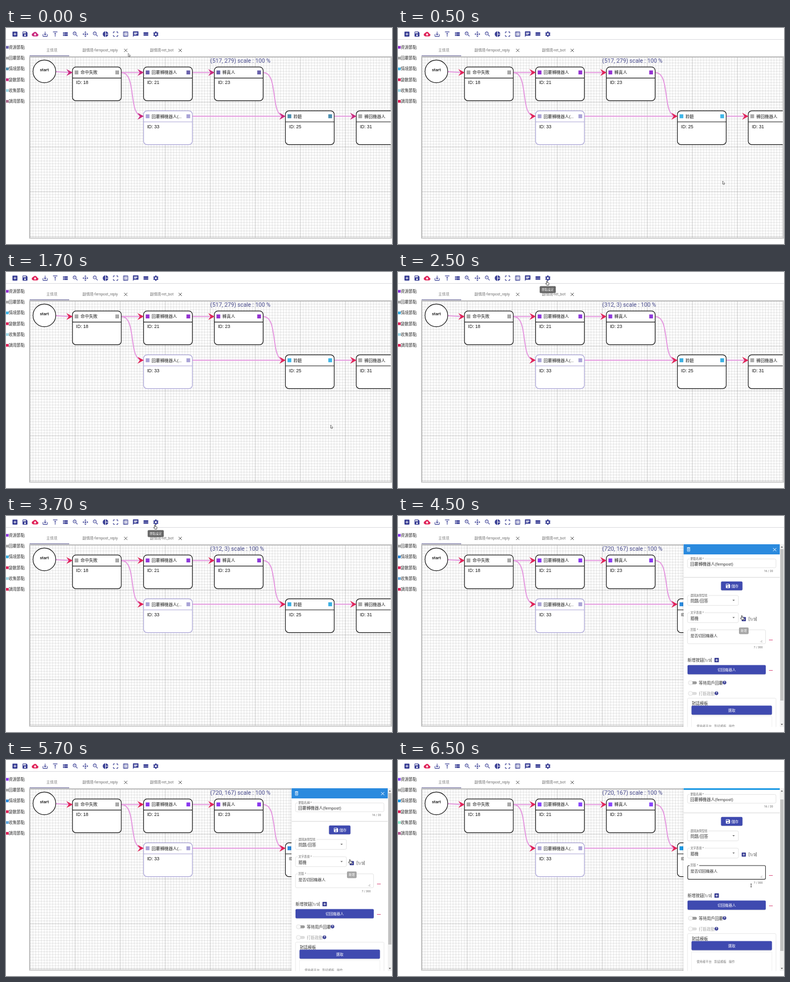
These frames come from a looping animation (720 px wide and 405 px high, 8000 ms). An HTML page:

```html
<!DOCTYPE html>
<html lang="zh-Hant">
<head>
<meta charset="utf-8">
<title>Flow editor</title>
<style>
html, body { margin: 0; width: 100%; height: 100%; overflow: hidden; background: #fff; }
svg { display: block; width: 720px; height: 405px; animation: play 8s step-end infinite; }
text { font-family: Roboto, "Noto Sans CJK TC", "Noto Sans CJK", sans-serif; white-space: pre; }
.id { font-family: "Liberation Sans", Arial, sans-serif; }
.purple { fill: var(--purple); }
.blue { fill: var(--blue); }
.red { fill: var(--red); }
.collect { fill: var(--collect); }
.call { fill: var(--call); }
.minus { fill: #d8487a; }
.move { opacity: var(--idle); }
.leave { opacity: var(--arrow); }
.hover { opacity: var(--hover); }
.near { opacity: var(--near); }
.panel { opacity: var(--panel); }
.edit { opacity: var(--edit); }
.add { opacity: var(--add); }
.body { transform: translateY(var(--dy)); }
.thumb { transform: translateY(var(--bar)); }
@keyframes play {
  0% {
    --purple: #6a62ac; --blue: #4e8fb0; --red: #c92a7e; --collect: #9fd9e8; --call: #ab6d90;
    --idle: 1; --arrow: 0; --hover: 0; --near: 1; --panel: 0; --add: 0; --edit: 0; --dy: 0px; --bar: 0px;
  }
  6.25% {
    --purple: #9432d0; --blue: #3fb6e8; --red: #e0245a; --collect: #9fd9e8; --call: #e0245a;
    --idle: 0; --arrow: 1; --hover: 0; --near: 1; --panel: 0; --add: 0; --edit: 0; --dy: 0px; --bar: 0px;
  }
  31.25% {
    --purple: #8e39da; --blue: #3aafe2; --red: #e0245a; --collect: #9fd9e8; --call: #e0245a;
    --idle: 0; --arrow: 0; --hover: 1; --near: 0; --panel: 0; --add: 0; --edit: 0; --dy: 0px; --bar: 0px;
  }
  56.25% {
    --purple: #8a38ee; --blue: #2a8ade; --red: #e0245a; --collect: #5fa9e0; --call: #e0245a;
    --idle: 0; --arrow: 0; --hover: 0; --near: 0; --panel: 1; --add: 1; --edit: 0; --dy: 0px; --bar: 0px;
  }
  81.25%, 100% {
    --purple: #8846fc; --blue: #1a98e4; --red: #e0245a; --collect: #90f0d0; --call: #b85a95;
    --idle: 0; --arrow: 0; --hover: 0; --near: 0; --panel: 1; --add: 0; --edit: 1; --dy: -16px; --bar: 12px;
  }
}
</style>
</head>
<body>
<svg id="stage" viewBox="0 0 720 405"></svg>
<script>
const NAVY = '#3b4095', INDIGO = '#3f4ab0', GRAY = '#a9a9a9', LAV = '#a9a3d6';
const LENS = 'M15.5 14h-.79l-.28-.27C15.41 12.59 16 11.11 16 9.5 16 5.91 13.09 3 9.5 3S3 5.91 3 9.5 5.91 16 9.5 16c1.61 0 3.09-.59 4.23-1.57l.27.28v.79l5 4.99L20.49 19l-4.99-5zm-6 0C7.01 14 5 11.99 5 9.5S7.01 5 9.5 5 14 7.01 14 9.5 11.99 14 9.5 14z';
const ICONS = {
  add: 'M19 3H5c-1.11 0-2 .9-2 2v14c0 1.1.89 2 2 2h14c1.1 0 2-.9 2-2V5c0-1.1-.9-2-2-2zm-2 10h-4v4h-2v-4H7v-2h4V7h2v4h4v2z',
  save: 'M17 3H5c-1.11 0-2 .9-2 2v14c0 1.1.89 2 2 2h14c1.1 0 2-.9 2-2V7l-4-4zm-5 16c-1.66 0-3-1.34-3-3s1.34-3 3-3 3 1.34 3 3-1.34 3-3 3zm3-10H5V5h10v4z',
  cloud: 'M19.35 10.04C18.67 6.59 15.64 4 12 4 9.11 4 6.6 5.64 5.35 8.04 2.34 8.36 0 10.91 0 14c0 3.31 2.69 6 6 6h13c2.76 0 5-2.24 5-5 0-2.64-2.05-4.78-4.65-4.96zM17 13l-5 5-5-5h3V9h4v4h3z',
  down: 'M19 12v7H5v-7H3v7c0 1.1.9 2 2 2h14c1.1 0 2-.9 2-2v-7h-2zm-6 .67l2.59-2.58L17 11.5l-5 5-5-5 1.41-1.41L11 12.67V3h2z',
  up: 'M8 11h3v10h2V11h3l-4-4-4 4zM4 3v2h16V3H4z',
  list: 'M4 14h4v-4H4zM4 19h4v-4H4zM4 9h4V5H4zM9 14h12v-4H9zM9 19h12v-4H9zM9 5v4h12V5z',
  zoomIn: LENS + 'M12 10h-2v2H9v-2H7V9h2V7h1v2h2z',
  center: 'M15.54 5.54L13.77 7.3 12 5.54 10.23 7.3 8.46 5.54 12 2zm2.92 10l-1.76-1.77L18.46 12l-1.76-1.77 1.76-1.77L22 12zm-10 2.92l1.77-1.76L12 18.46l1.77-1.76 1.77 1.76L12 22zm-2.92-10l1.76 1.77L5.54 12l1.76 1.77-1.76 1.77L2 12zM9 12a3 3 0 0 0 6 0 3 3 0 0 0-6 0z',
  zoomOut: LENS + 'M7 9h5v1H7z',
  pie: 'M11 2v20c-5.07-.5-9-4.79-9-10s3.93-9.5 9-10zm2.03 0v8.99H22c-.47-4.74-4.24-8.52-8.97-8.99zm0 11.01V22c4.74-.47 8.5-4.25 8.97-8.99z',
  full: 'M3 5v4h2V5h4V3H5c-1.1 0-2 .9-2 2zm2 10H3v4c0 1.1.9 2 2 2h4v-2H5v-4zm14 4h-4v2h4c1.1 0 2-.9 2-2v-4h-2v4zm0-16h-4v2h4v4h2V5c0-1.1-.9-2-2-2z',
  board: 'M13 7.5h5v2h-5zM13 14.5h5v2h-5zM19 3H5c-1.1 0-2 .9-2 2v14c0 1.1.9 2 2 2h14c1.1 0 2-.9 2-2V5c0-1.1-.9-2-2-2zM19 19H5V5h14zM11 6H6v5h5zM10 10H7V7h3zM11 13H6v5h5zM10 17H7v-3h3z',
  chat: 'M20 2H4c-1.1 0-1.99.9-1.99 2L2 22l4-4h14c1.1 0 2-.9 2-2V4c0-1.1-.9-2-2-2zM6 9h12v2H6V9zm8 5H6v-2h8v2zm4-6H6V6h12v2z',
  rows: 'M4 18h17v-6H4zM4 5v6h17V5z',
  gear: 'M19.14 12.94c.04-.3.06-.61.06-.94 0-.32-.02-.64-.07-.94l2.03-1.58c.18-.14.23-.41.12-.61l-1.92-3.32c-.12-.22-.37-.29-.59-.22l-2.39.96c-.5-.38-1.03-.7-1.62-.94l-.36-2.54c-.04-.24-.24-.41-.48-.41h-3.84c-.24 0-.43.17-.47.41l-.36 2.54c-.59.24-1.13.57-1.62.94l-2.39-.96c-.22-.08-.47 0-.59.22L2.74 8.87c-.12.21-.08.47.12.61l2.03 1.58c-.05.3-.09.63-.09.94s.02.64.07.94l-2.03 1.58c-.18.14-.23.41-.12.61l1.92 3.32c.12.22.37.29.59.22l2.39-.96c.5.38 1.03.7 1.62.94l.36 2.54c.05.24.24.41.48.41h3.84c.24 0 .44-.17.47-.41l.36-2.54c.59-.24 1.13-.56 1.62-.94l2.39.96c.22.08.47 0 .59-.22l1.92-3.32c.12-.22.07-.47-.12-.61zM12 15.6c-1.98 0-3.6-1.62-3.6-3.6s1.62-3.6 3.6-3.6 3.6 1.62 3.6 3.6-1.62 3.6-3.6 3.6z',
  bin: 'M6 19c0 1.1.9 2 2 2h8c1.1 0 2-.9 2-2V7H6zM8 9h8v10H8zM10 11h1.5v6H10zM12.5 11H14v6h-1.5zM15.5 4l-1-1h-5l-1 1H5v2h14V4z'
};

const text = (x, y, s, size = 7.6, fill = '#333', more = '') =>
  `<text x="${x}" y="${y}" font-size="${size}" fill="${fill}" ${more}>${s}</text>`;
const mid = (x, y, s, size, fill, more = '') => text(x, y, s, size, fill, 'text-anchor="middle" ' + more);
const rect = (x, y, w, h, fill, more = '') =>
  `<rect x="${x}" y="${y}" width="${w}" height="${h}" fill="${fill}" ${more}/>`;
const path = (d, more) => `<path d="${d}" ${more}/>`;
const group = (cls, ...parts) => `<g class="${cls}">${parts.join('')}</g>`;
const paint = c => c[0] === '#' ? `fill="${c}"` : `class="${c}"`;
const icon = (name, x, y, size = 12.4, color = NAVY) => {
  const k = size / 24;
  return path(ICONS[name], `${paint(color)} fill-rule="evenodd" transform="translate(${x - size / 2} ${y - size / 2}) scale(${k})"`);
};
const cross = (x, y, r, color) =>
  path(`M${x - r} ${y - r}l${2 * r} ${2 * r}m0 ${-2 * r}l${-2 * r} ${2 * r}`, `stroke="${color}" stroke-width="1"`);

function grid() {
  const lines = step => {
    let d = '';
    for (let x = 45; x < 718; x += step) d += `M${x.toFixed(2)} 55V393`;
    for (let y = 55; y < 393; y += step) d += `M45 ${y.toFixed(2)}H718`;
    return d;
  };
  return path(lines(5.25), 'stroke="#808080" stroke-width=".2"') +
    path(lines(84), 'stroke="#808080" stroke-width=".3"');
}

function link(x1, y1, x2, y2) {
  const bow = (x2 - x1) * .72;
  return path(`M${x1} ${y1}C${x1 + bow} ${y1} ${x2 - bow} ${y2} ${x2 - 2} ${y2}`, 'fill="none" stroke="#e59ae0" stroke-width="2"');
}
const head = (x, y) => path(`M${x - 11.5} ${y - 6.5}L${x + .5} ${y}L${x - 11.5} ${y + 6.5}L${x - 7} ${y}z`, 'class="red"');

function node(x, y, name, id, color, edge = '#111') {
  const dot = dx => `<rect x="${x + dx}" y="${y + 6.4}" width="7" height="7.4" ${paint(color)}/>`;
  return rect(x, y, 91, 63.2, '#fff', `rx="6.4" stroke="${edge}" stroke-width="1.2"`) +
    path(`M${x} ${y + 20.6}h91`, `stroke="${edge}" stroke-width="1.2"`) +
    dot(4) + dot(80) + text(x + 15, y + 13.2, name, 7.9, '#222') +
    text(x + 6.6, y + 32.2, 'ID: ' + id, 8.6, '#111', 'class="id"');
}

const pointer = (cls, x, y) =>
  path(`M${x} ${y}v6l1.4-1.2 1 2 .9-.4-.9-2h1.8z`, `class="${cls}" fill="#fff" stroke="#444" stroke-width=".7"`);
const hand = (cls, x, y) =>
  path(`M${x - .8} ${y - 3.6}q.8-.8 1.4 0v2.8l2.6.7q.7.3.5 1.2l-.6 3h-3.6l-2.3-3q.4-1 1.4-.2l.6.5z`,
    `class="${cls}" fill="#fff" stroke="#222" stroke-width=".8"`);

function toolbar() {
  const names = ['add', 'save', 'cloud', 'down', 'up', 'list', 'zoomIn', 'center', 'zoomOut', 'pie', 'full', 'board', 'chat', 'rows', 'gear'];
  return rect(0, 21, 720, 1, '#d9d9de') +
    names.map((n, i) => icon(n, 16.7 + i * 18.77, 11.5, 12.4, n === 'cloud' ? 'red' : NAVY)).join('');
}

function legend() {
  const rows = [['資源', 'purple'], ['回覆', GRAY], ['情境', 'blue'], ['變數', 'red'], ['收集', 'collect'], ['調用', 'call']];
  return rows.map(([name, c], i) => {
    const y = 36 + i * 20.25;
    return `<rect x="0" y="${y - 2.3}" width="5" height="5" ${paint(c)}/>` + text(5, y + 2.8, name + '節點', 7.5, '#333');
  }).join('');
}

function tabs() {
  return mid(85.5, 44.4, '主情境', 6.8, '#858585') +
    text(142.5, 44.4, '副情境-fernpost_reply', 6.9, '#707070') + cross(223.3, 42, 3, '#555') +
    text(268.5, 44.4, '副情境-ret_bot', 6.9, '#707070') + cross(325, 42, 3, '#555') +
    rect(44, 51.3, 74, 1.5, '#8583ab');
}

function flow() {
  const a = 83.4, b = 165.4;
  const tips = [[124, a], [256.6, a], [388.6, a], [256.6, b], [521.2, b], [653.3, b]];
  return path('M93 82L120 83.4', 'stroke="#e59ae0" stroke-width="2"') +
    link(215, a, 256.6, a) + link(215, a, 256.6, b) + link(347.6, a, 388.6, a) +
    link(479.6, a, 521.2, b) + link(347.6, b, 521.2, b) + link(612.2, b, 653.3, b) +
    '<circle cx="71.6" cy="81.4" r="21.2" fill="#fff" stroke="#111" stroke-width="1.2"/>' +
    mid(71.6, 81, 'start', 8, '#111', 'font-weight="500"') +
    node(124, 73.2, '命中失敗', 18, GRAY) + node(256.6, 73.2, '回覆轉機器人', 21, 'purple') +
    node(388.6, 73.2, '轉真人', 23, 'purple') + node(256.6, 155.4, '回覆轉機器人(...', 33, LAV, LAV) +
    node(521.2, 155.4, '聆聽', 25, 'blue') + node(653.3, 155.4, '轉回機器人', 31, GRAY) +
    tips.map(p => head(...p)).join('');
}

function field(x, y, w, h, label, lw, value, base) {
  return rect(x, y, w, h, '#fff', 'rx="2.5" stroke="#dcdcdc" stroke-width=".8"') +
    rect(x + 4, y - 2, lw + 3, 4, '#fff') + text(x + 5.5, y + 1.9, label, 5.3, '#666') +
    text(x + 5.5, base, value, 7.5, '#333');
}
const caret = (x, y) => path(`M${x - 2.2} ${y - 1}h4.4l-2.2 2.3z`, 'fill="#666"');
const button = (x, y, w, h, more = '') =>
  rect(x, y + .8, w, h, '#c9c9d2', 'rx="2"') + rect(x, y, w, h, INDIGO, 'rx="2"') + more;
const minus = y => rect(692, y, 7, 1, '', 'class="minus"');
const help = (x, y) => `<circle cx="${x}" cy="${y}" r="3.4" fill="${NAVY}"/>` + mid(x, y + 2.1, '?', 5.8, '#fff', 'font-weight="700"');
function toggle(y, label, x, on) {
  return rect(544, y - 2.7, 13.4, 5.4, on ? '#9a9a9a' : '#dcdcdc', 'rx="2.7"') +
    `<circle cx="545.5" cy="${y}" r="4" fill="#fafafa" stroke="#d4d4d4" stroke-width=".7"/>` +
    text(561, y + 2.8, label, 7.5, on ? '#333' : '#aaa') + help(x, y - .4);
}

function panel() {
  const form = group('body',
    rect(532.5, 53, 180, 19, '', 'class="blue"'), icon('bin', 542, 62.6, 10.5, '#fff'), cross(702.6, 63, 3, '#fff'),
    field(540, 80.5, 165, 16.5, '節點名稱 *', 25, '', 0),
    text(545, 93.4, '回覆轉機器人(fernpost)', 7.7, '#333'),
    text(682.5, 105.4, '16 / 20', 5.4, '#666'), rect(532.5, 114.6, 180, 1, '#d5d5d5'),
    button(602.5, 122.7, 40, 16.6, icon('save', 615.5, 131.2, 10.5, '#fff') + text(621.8, 133.8, '儲存', 6.8, '#fff')),
    field(540, 149, 95, 18.6, '選擇詢問型態', 32, '問題/回答', 162.4), caret(626, 158),
    field(540, 181.3, 95, 18.6, '文字表達 *', 25, '隨機', 194.6), caret(626, 190.4),
    icon('add', 645, 193.4, 10.5), text(654, 195.6, '[1/3]', 7.4, '#333'),
    field(540, 213.4, 145.6, 26.2, '回答 *', 14, '', 0),
    group('edit', path('M544 214H542.5q-2 0-2 2v21.6q0 2 2 2h141q2 0 2-2V216q0-2-2-2H562', 'fill="none" stroke="#333" stroke-width="1.1"')),
    text(545.5, 227.4, '是否切回機器人', 7.2, '#333'), path('M676 236.5l3.4-3.4m0 3.4l-1.4 0', 'stroke="#777" stroke-width=".7"'),
    minus(232), text(663.5, 248.2, '7 / 300', 5.3, '#666'),
    text(540, 272.8, '新增按鈕[1/3]', 7.5, '#333'), icon('add', 594.4, 270.2, 11),
    button(540, 279.4, 146, 17.4, mid(613, 290.6, '切回機器人', 6.8, '#fff')), minus(289),
    toggle(312.7, '等待用戶回覆', 609, true), toggle(332.7, '打斷啟動', 594, false),
    rect(540, 341.5, 165, 90, 'none', 'rx="2" stroke="#e2e2e2" stroke-width=".8"'),
    text(548, 353.6, '對話模板', 7.5, '#333'),
    button(547.5, 355.6, 150, 17, mid(622.5, 366.7, '選取', 6.8, '#fff')),
    rect(547.5, 376, 150, 60, 'none', 'stroke="#eaeaea" stroke-width=".7"'),
    text(557, 396, '使用者平台', 5.6, '#777'), text(590, 396, '對話模板', 5.6, '#777'), text(617, 396, '操作', 5.6, '#777'));
  return group('panel',
    rect(530.5, 53, 2, 342, '#000', 'opacity=".1"'), rect(532.5, 53, 187.5, 342.5, '#fff'),
    `<g clip-path="url(#view)">${form}</g>`,
    rect(712.3, 53, 7.7, 342.5, '#f1f1f1'), rect(713, 62, 6, 284, '#c1c1c1', 'class="thumb"'),
    path('M714 59.2h4l-2-2.4zM714 389.8h4l-2 2.4z', 'fill="#555"'));
}

const tip = (cls, x, y, w, h, s, fill) =>
  group(cls, rect(x, y, w, h, fill, 'rx="1.8"'), mid(x + w / 2, y + h / 2 + 2.1, s, 5.7, '#fff'));
const status = (cls, pos) => text(381, 65.2, `(${pos}) scale : 100 %`, 10.7, '#474a8c', `class="${cls}"`);

document.getElementById('stage').innerHTML =
  '<defs><clipPath id="view"><rect x="532.5" y="53" width="180" height="342.5"/></clipPath>' +
  '<clipPath id="board"><rect x="43" y="53" width="674.6" height="342"/></clipPath></defs>' +
  toolbar() + legend() + tabs() +
  rect(44, 54, 675, 340, '#fff', 'stroke="#cacaca" stroke-width="2"') +
  `<g clip-path="url(#board)">${grid()}${flow()}</g>` +
  status('near', '517, 279') + status('hover', '312, 3') + status('panel', '720, 167') +
  panel() +
  tip('hover', 264.3, 26.4, 30, 13.2, '節點設定', '#666') +
  tip('add', 636, 209, 18, 12.4, '新增', '#a6a6a6') +
  pointer('move', 228, 47.5) + pointer('leave', 605.5, 287) +
  hand('hover', 278, 20.5) + hand('add', 641.5, 190.5) +
  path('M657.4 232.4h2.6M657.4 238h2.6M658.7 232.4V238', 'class="edit" stroke="#333" stroke-width=".8"');
</script>
</body>
</html>
```
